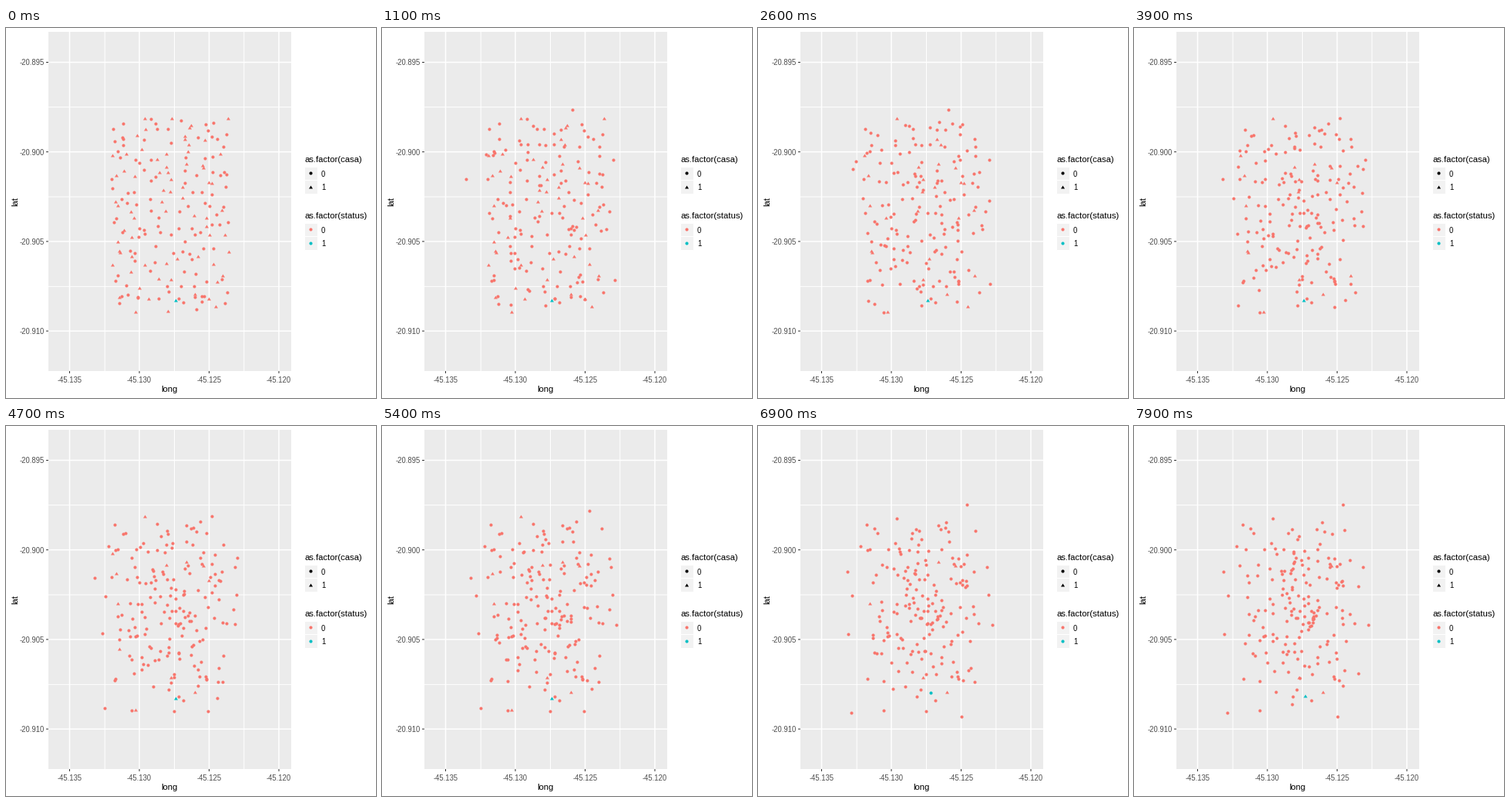
These frames come from a looping animation (480 px wide and 480 px high, 8 s). A matplotlib script:

```python
import numpy as np
import matplotlib.pyplot as plt
from matplotlib.animation import FuncAnimation
from matplotlib.patches import Rectangle

SIZE, FRAMES, STEP = 480, 80, 100
SALMON, TEAL = "#F8766D", "#00BFC4"
COLS, ROWS, AT_HOME = 11, 17, 72
LOW, HIGH = np.array([136, 113]), np.array([290, 369])
CENTRE = np.array([214, 235])
RATE, JUMP, PULL = 0.05, 10, 0.08
rng = np.random.default_rng(12)

# Homes kept longest, and far spots reached at a given step.
LAST_HOMES = [(256, 181), (214, 326), (245, 345), (145, 230), (234, 176),
              (168, 368), (208, 180), (180, 117), (143, 191), (138, 165),
              (263, 200), (147, 289)]
FAR_SPOTS = [(163, 369, 20), (297, 183, 35), (133, 156, 44), (141, 128, 46),
             (122, 220, 50), (304, 258, 50), (264, 377, 60), (117, 270, 62),
             (121, 372, 62), (271, 102, 63)]


def village():
    """One jittered spot per block, in random order."""
    cells = np.array([(i, j) for i in range(COLS) for j in range(ROWS)])
    spots = cells + rng.uniform(0.05, 0.95, cells.shape)
    spots = LOW + spots * (HIGH - LOW) / [COLS, ROWS]
    return rng.permutation(spots)


def simulate():
    """Positions per step, and the step at which each one leaves home."""
    pos = village()
    pos[:len(LAST_HOMES)] = LAST_HOMES
    leave = np.zeros(len(pos))
    rank = np.arange(AT_HOME) + 0.5
    leave[:AT_HOME] = 1 + np.floor(-26 * np.log(rank / AT_HOME))
    paths = np.empty((FRAMES, len(pos), 2))
    for t in range(FRAMES):
        move = (t == leave) | ((rng.random(len(pos)) < RATE) & (t > leave))
        move &= t > 0
        jump = rng.normal(0, JUMP, pos.shape) + PULL * (CENTRE - pos)
        pos = pos + move[:, None] * jump
        paths[t] = pos
    return paths, leave


def hike(x, y, arrive, hops=4):
    """Walk out of the village to a far spot in a few hops and stay."""
    start = np.clip([x, y], LOW, HIGH) + 0.15 * (CENTRE - [x, y])
    done = np.minimum(np.arange(FRAMES) * hops // arrive, hops) / hops
    return start + done[:, None] * ([x, y] - start)


paths, leave = simulate()
for k, spot in enumerate(FAR_SPOTS, 1):
    paths[:, -k] = hike(*spot)

plt.rcParams["font.family"] = "Liberation Sans"
plt.rcParams["toolbar"] = "None"
fig = plt.figure(figsize=(SIZE / 72, SIZE / 72), dpi=72, facecolor="white")
ax = fig.add_axes([0, 0, 1, 1])
ax.set(xlim=(0, SIZE), ylim=(SIZE, 0))
ax.axis("off")

TRIANGLE = [(-1, -0.8), (1, -0.8), (0, 0.8)]


def box(x, y, w, h, color, edge=0):
    ax.add_patch(Rectangle((x, y), w, h, fc=color, ec="white", lw=edge,
                           zorder=0))


def line(xs, ys, width=1.0, color="white"):
    ax.plot(xs, ys, color=color, lw=width, zorder=1,
            solid_capstyle="butt", snap=False)


def label(x, y, s, size=9.5, color="#4D4D4D", ha="center",
          va="center_baseline", **kw):
    ax.text(x, y, s, fontsize=size, color=color, ha=ha, va=va, **kw)


def dots(marker, color, zorder=3):
    size = 4.1 if marker == "o" else 5
    shape = "o" if marker == "o" else TRIANGLE
    return ax.scatter([], [], s=size ** 2, marker=shape, c=color,
                      linewidths=0, zorder=zorder)


box(55, 5, 315, 440, "#EBEBEB")
for k in range(3):
    x, y = 128.2 + 90.3 * k, 102.6 + 116.4 * k
    line([x, x], [5, 445])
    line([55, 370], [y, y])
for k in range(4):
    x, y = 82.5 + 90.5 * k, 44.5 + 116.2 * k
    line([x, x], [5, 445], 1.5)
    line([55, 370], [y, y], 1.5)
    line([x, x], [445, 448], 1, "#333333")
    line([52, 55], [y, y], 1, "#333333")
    label(x, 455.5, f"{-45.135 + 0.005 * k:.3f}")
    label(50, y, f"{-20.895 - 0.005 * k:.3f}", ha="right")
label(212, 472.5, "long", 11.3, "black", va="baseline")
label(12, 225, "lat", 11.3, "black", rotation=90, va="center")


def legend(title, y, keys):
    label(387, y, title, 11.3, "black", "left", "baseline")
    for k, (marker, color) in enumerate(keys):
        top = y + 6 + 17.3 * k
        box(387, top, 17.3, 17.3, "#F2F2F2", 1)
        dots(marker, color).set_offsets([(395.4, top + 8.4)])
        label(409, top + 8.8, str(k), color="black", ha="left")


legend("as.factor(casa)", 174, [("o", "black"), ("^", "black")])
legend("as.factor(status)", 247, [("o", SALMON), ("o", TEAL)])

outside, inside = dots("o", SALMON), dots("^", SALMON)
sick_out, sick_in = dots("o", TEAL, 2), dots("^", TEAL, 2)
EMPTY = np.empty((0, 2))


def draw(t):
    home = t < leave
    inside.set_offsets(paths[t, home])
    outside.set_offsets(paths[t, ~home])
    away = 62 <= t < 75
    sick_out.set_offsets([(224, 346)] if away else EMPTY)
    spot = (220, 353) if t < 62 else (221.5, 349.5)
    sick_in.set_offsets(EMPTY if away else [spot])
    return outside, inside, sick_out, sick_in


anim = FuncAnimation(fig, draw, frames=FRAMES, interval=STEP,
                     repeat=True, repeat_delay=0, blit=False)
plt.show()
```
